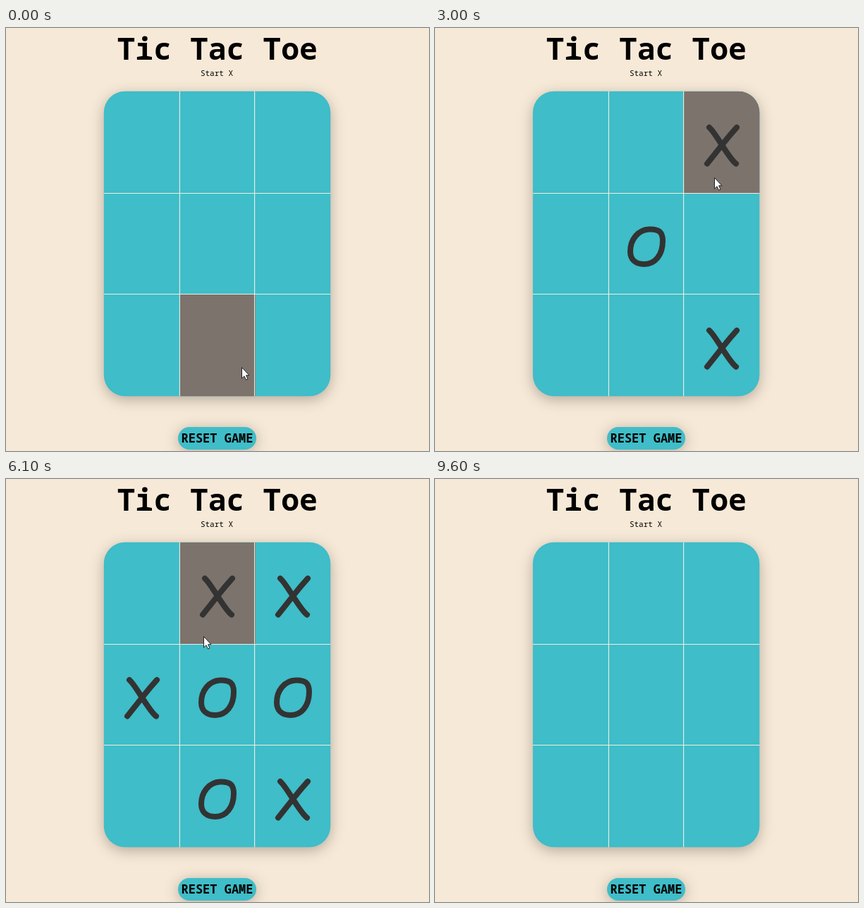
Write an HTML page that moves like this. It is 600 px wide and 600 px high and loops after 9700 ms.

```html
<!DOCTYPE html>
<html lang="en">
<head>
<meta charset="utf-8">
<title>Tic Tac Toe</title>
<style>
  html, body { margin: 0; width: 100%; height: 100%; overflow: hidden; background: #f7e9d7; }
  svg { display: block; width: 100%; height: 100%; }
  text { font-family: "Noto Sans Mono", "DejaVu Sans Mono", monospace; text-anchor: middle; fill: #000; }
  .bold { font-weight: 700; }
  .mark { fill: none; stroke: #333; stroke-width: 8; stroke-linecap: round; stroke-linejoin: round; }
</style>
</head>
<body>
<svg viewBox="0 0 600 600">
  <defs>
    <filter id="soft" x="-30%" y="-60%" width="160%" height="220%">
      <feGaussianBlur stdDeviation="10"/>
    </filter>
    <clipPath id="round"><rect x="138.8" y="89.7" width="321.5" height="432.5" rx="30"/></clipPath>
  </defs>
  <rect width="600" height="600" fill="#f7e9d7"/>
  <text id="title" class="bold" x="299.7" y="45" font-size="43.1"></text>
  <text id="status" y="68" font-size="11">Start X</text>
  <g fill="#000" fill-opacity=".28" filter="url(#soft)">
    <rect x="139" y="95" width="321" height="432" rx="30"/>
    <rect x="244" y="569" width="111" height="32" rx="16"/>
  </g>
  <g clip-path="url(#round)">
    <rect x="138" y="89" width="323" height="434" fill="#3fbdc8"/>
    <rect id="hover" width="108" height="145" fill="#7c736c"/>
    <path d="M246.4 89V523M352.6 89V523M138 234.5H461M138 377.5H461" stroke="#f0efe2" stroke-width="1.1"/>
  </g>
  <g id="marks" class="mark"></g>
  <rect x="244" y="566" width="111" height="32" rx="16" fill="#3fbdc8"/>
  <text class="bold" x="299.5" y="588" font-size="17">RESET GAME</text>
  <path id="cursor" d="M.5 .5V16L4 12.7 6.5 18 9 17 6.6 11.7H11Z" fill="#fff" stroke="#222" stroke-linejoin="round"/>
</svg>
<script>
const LOOP = 9700, STEP = 100, TRAVEL = 400, GONE = 9600;
const BOARD = { x: 139, y: 90, w: 107, h: 144 };

// Centre lines of the marks, relative to the cell centre
const SHAPES = {
  X: 'M-18 -25Q-14 -22 0 0T20 26.5M21 -25Q11 -14 0 0T-21 26.5',
  O: 'M4 -24.5C18 -25 23 -20 23 -8C23 12 12 25 -3 25C-16 25 -23 18 -23 7C-23 -10 -12 -24 4 -24.5Z'
};

// Pointer stops: arrival time and place. Every stop on the board is a click.
const STOPS = [
  { t: 0, x: 334, y: 481 },
  { t: 800, x: 396, y: 468 },
  { t: 1900, x: 302, y: 316 },
  { t: 2800, x: 396, y: 212 },
  { t: 3400, x: 400, y: 290 },
  { t: 3900, x: 243, y: 337 },
  { t: 4600, x: 300, y: 450 },
  { t: 5400, x: 280, y: 223 },
  { t: 6600, x: 205, y: 180 },
  { t: 7200, x: 212, y: 418 },
  { t: 8400, x: 300, y: 582 },
  { t: 9800, x: 755, y: 352 }
];
const MOVES = STOPS.slice(1, -2);
const DRAW = MOVES[MOVES.length - 1].t, RESET = STOPS[STOPS.length - 2].t;

const byId = id => document.getElementById(id);
const title = byId('title'), status = byId('status'), cursor = byId('cursor'), hover = byId('hover');

const show = (el, on) => el.setAttribute('visibility', on ? 'visible' : 'hidden');
const place = (el, x, y) => el.setAttribute('transform', `translate(${x} ${y})`);
const ease = k => k * k * (3 - 2 * k);

function cellAt({ x, y }) {
  const col = Math.floor((x - BOARD.x) / BOARD.w), row = Math.floor((y - BOARD.y) / BOARD.h);
  return {
    inside: col >= 0 && col < 3 && row >= 0 && row < 3,
    x: BOARD.x + col * BOARD.w,
    y: BOARD.y + row * BOARD.h
  };
}

const marks = MOVES.map((move, i) => {
  const el = document.createElementNS('http://www.w3.org/2000/svg', 'path');
  const cell = cellAt(move);
  el.setAttribute('d', SHAPES[i % 2 ? 'O' : 'X']);
  place(el, cell.x + BOARD.w / 2 + 0.5, cell.y + BOARD.h / 2 + 4);
  byId('marks').appendChild(el);
  return { el, t: move.t };
});

// Rest at each stop, then glide to the next one during the last TRAVEL ms
function pointer(t) {
  const i = STOPS.findIndex(s => s.t > t), a = STOPS[i - 1], b = STOPS[i];
  const k = ease(Math.max(0, 1 - (b.t - t) / TRAVEL));
  return { x: Math.round(a.x + (b.x - a.x) * k), y: Math.round(a.y + (b.y - a.y) * k) };
}

function render(t) {
  const tip = pointer(t), cell = cellAt(tip);
  const drawn = t >= DRAW && t < RESET;
  show(cursor, t < GONE);
  place(cursor, tip.x, tip.y);
  show(hover, t < GONE && cell.inside);
  place(hover, cell.x, cell.y);
  marks.forEach(m => show(m.el, t >= m.t && t < RESET));
  title.textContent = drawn ? 'EMPATOU!!!' : 'Tic Tac Toe';
  status.setAttribute('x', drawn ? 300 : 299);
}

const start = performance.now();
function tick() {
  const t = (performance.now() - start) % LOOP;
  render(Math.floor(t / STEP) * STEP);
  requestAnimationFrame(tick);
}
tick();
</script>
</body>
</html>
```
